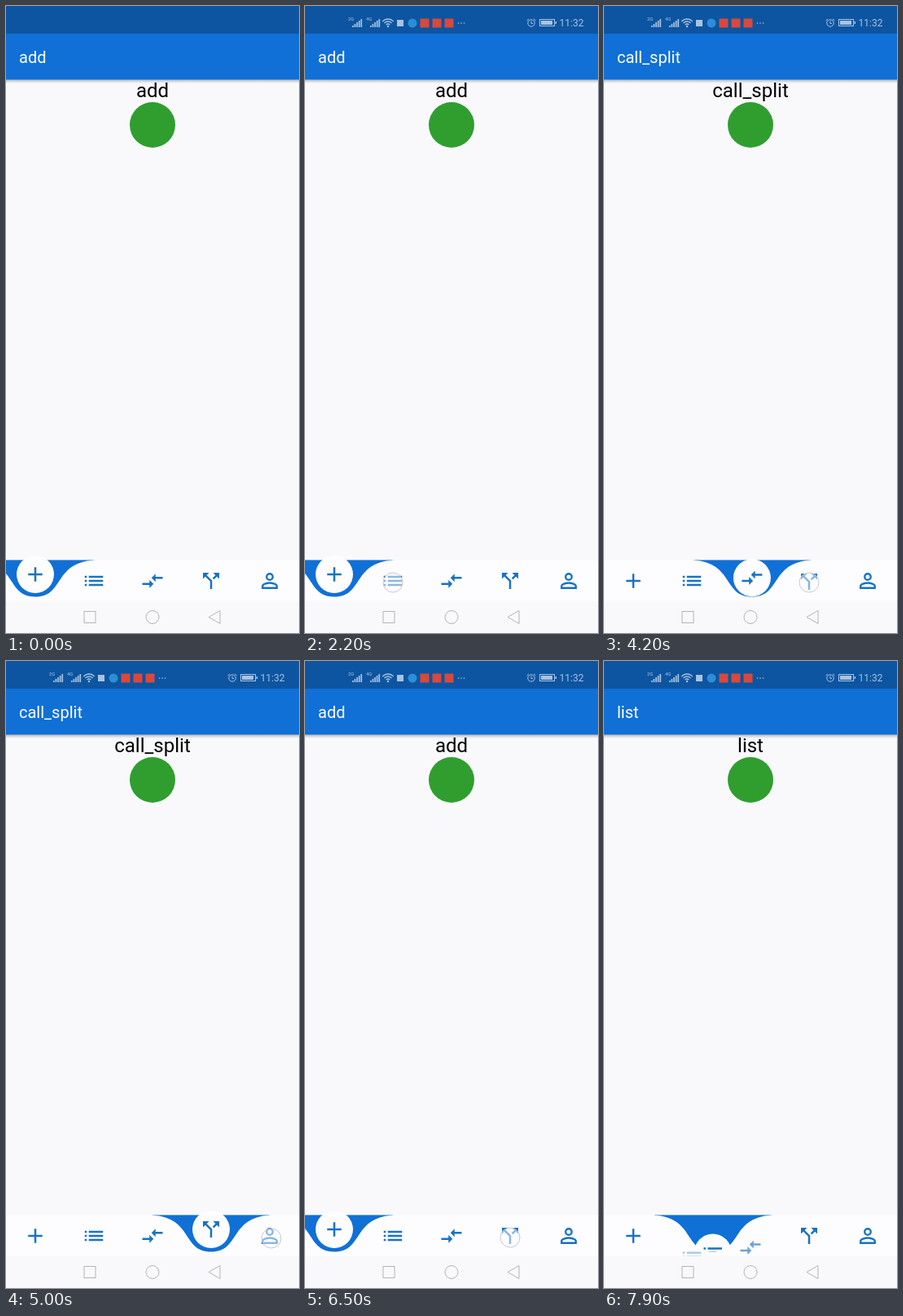
Animation, 360 px wide and 770 px high, one loop 8 s. Source, as an HTML page with a canvas:

```html
<!DOCTYPE html>
<html lang="en">
<head>
<meta charset="utf-8">
<title>Curved navigation bar</title>
<style>
  html, body { margin: 0; width: 100%; height: 100%; overflow: hidden; background: #f9f9fb; }
  canvas { display: block; width: 360px; height: 770px; }
</style>
</head>
<body>
<canvas id="stage"></canvas>
<script>
const W = 360, H = 770, LOOP = 8000, SLOT = W / 5;
const BAR_TOP = 680.4, BAR_BOTTOM = 731, CURVE = 75, MOVE = 700;
const BLUE = '#1070d6', ICON = '#1a72c2', STATUS = '#0d55a1', TINT = '#a9c3e2';
const PAPER = '#f9f9fb', BAR = '#fdfdff';

const canvas = document.getElementById('stage');
const ctx = canvas.getContext('2d');
const dpr = window.devicePixelRatio || 1;
canvas.width = W * dpr;
canvas.height = H * dpr;

const titles = ['add', 'list', 'compare_arrows', 'call_split', 'perm_identity'];
const icons = [
  'M5 11h14v2H5zM11 5h2v14h-2z',
  'M3 7h2v2H3zM3 11h2v2H3zM3 15h2v2H3zM7 7h14v2H7zM7 11h14v2H7zM7 15h14v2H7z',
  'M9 14H2v2h7v3l4-4-4-4zM15 13v-3h7V8h-7V5l-4 4z',
  'M14 4l2.3 2.3-2.9 2.9 1.4 1.4 2.9-2.9L20 10V4zM10 4H4v6l2.3-2.3 4.7 4.7V20h2v-8.4L7.7 6.3z',
  'M9 8a3 3 0 1 0 6 0a3 3 0 1 0-6 0zM5 19v-2c0-1.5 4-3 7-3s7 1.5 7 3v2z'
].map(d => new Path2D(d));

// Each tap: start of the move, destination slot, touch point.
const taps = [
  { at: 2260, to: 1, x: 108, y: 708 },
  { at: 3365, to: 2, x: 177, y: 706 },
  { at: 4190, to: 3, x: 252, y: 708 },
  { at: 5020, to: 4, x: 326, y: 709 },
  { at: 5726, to: 0, x: 40, y: 709 },
  { at: 6572, to: 3, x: 252, y: 708 },
  { at: 7453, to: 1, x: 108, y: 708 }
];

const clamp = v => Math.max(0, Math.min(1, v));

// cubic-bezier(0, 0, .58, 1)
function easeOut(x) {
  let lo = 0, hi = 1;
  for (let i = 0; i < 24; i++) {
    const s = (lo + hi) / 2;
    if (1.74 * s * s * (1 - s) + s ** 3 < x) lo = s; else hi = s;
  }
  return lo * lo * (3 - 2 * lo);
}

function navState(t) {
  let from = 0, to = 0, at = -MOVE;
  for (const tap of taps) {
    if (t < tap.at) break;
    from = to;
    to = tap.to;
    at = tap.at;
  }
  const p = easeOut(clamp((t - at) / MOVE));
  return {
    selected: to,
    pos: from + (to - from) * p,
    icon: p > 0.5 ? to : from,
    hide: 1 - Math.abs(1 - 2 * p)
  };
}

function rect(x, y, w, h, color) {
  ctx.fillStyle = color;
  ctx.fillRect(x, y, w, h);
}

function circle(x, y, r) {
  ctx.beginPath();
  ctx.arc(x, y, r, 0, 2 * Math.PI);
}

function disc(x, y, r, color) {
  circle(x, y, r);
  ctx.fillStyle = color;
  ctx.fill();
}

function text(str, x, y, size, color, align = 'left') {
  ctx.font = `${size}px Roboto, sans-serif`;
  ctx.textAlign = align;
  ctx.fillStyle = color;
  ctx.fillText(str, x, y);
}

function icon(index, x, y, alpha = 1) {
  ctx.save();
  ctx.globalAlpha = alpha;
  ctx.translate(x, y);
  ctx.scale(1.25, 1.25);
  ctx.translate(-12, -12);
  ctx.fillStyle = ctx.strokeStyle = ICON;
  ctx.lineWidth = 1.9;
  if (index === 4) ctx.stroke(icons[index]); else ctx.fill(icons[index]);
  ctx.restore();
}

function signal(x, label) {
  text(label, x - 5, 18, 6, TINT);
  for (let i = 0; i < 5; i++) rect(x + i * 2.6, 24 - i * 2, 1.7, 2 + i * 2, TINT);
}

function statusIcons(alpha) {
  ctx.save();
  ctx.globalAlpha = alpha;
  signal(58, '2G');
  signal(80, '4G');
  ctx.strokeStyle = TINT;
  ctx.lineWidth = 1.3;
  for (const r of [3, 6, 9]) {
    ctx.beginPath();
    ctx.arc(102, 25, r, -Math.PI * 0.77, -Math.PI * 0.23);
    ctx.stroke();
  }
  disc(102, 25, 1.2, TINT);
  rect(113, 17, 8, 8, TINT);
  disc(132, 21, 5.5, '#2a8fd6');
  for (const x of [147, 162, 177]) rect(x - 5.5, 15.5, 11, 11, '#d9483c');
  for (const x of [188.5, 192, 195.5]) disc(x, 21, 0.8, TINT);

  circle(278, 21, 4.2);
  ctx.moveTo(278, 18.5);
  ctx.lineTo(278, 21.5);
  ctx.lineTo(280, 21.5);
  ctx.moveTo(272.5, 18);
  ctx.lineTo(275, 15.8);
  ctx.moveTo(283.5, 18);
  ctx.lineTo(281, 15.8);
  ctx.lineWidth = 1;
  ctx.stroke();
  ctx.strokeRect(288.5, 16.5, 18, 8);
  rect(290, 18, 14, 5, TINT);
  rect(307.5, 19, 1.5, 3, TINT);
  text('11:32', 312.5, 25, 12, TINT);
  ctx.restore();
}

function appBar(title) {
  const shadow = ctx.createLinearGradient(0, 90, 0, 95);
  shadow.addColorStop(0, 'rgba(0,0,0,.28)');
  shadow.addColorStop(1, 'rgba(0,0,0,0)');
  rect(0, 90, W, 5, shadow);
  rect(0, 0, W, 34, STATUS);
  rect(0, 34, W, 56.4, BLUE);
  text(title, 16, 70, 20, '#fff');
}

function barShape(center) {
  const x = f => center + f * W;
  const y = f => BAR_TOP + f * CURVE;
  ctx.beginPath();
  ctx.moveTo(Math.min(0, x(-0.2)), BAR_TOP);
  ctx.lineTo(x(-0.2), BAR_TOP);
  ctx.bezierCurveTo(x(-0.06), y(0.05), x(-0.1), y(0.6), center, y(0.6));
  ctx.bezierCurveTo(x(0.1), y(0.6), x(0.06), y(0.05), x(0.2), BAR_TOP);
  ctx.lineTo(Math.max(W, x(0.2)), BAR_TOP);
  ctx.lineTo(Math.max(W, x(0.2)), H);
  ctx.lineTo(Math.min(0, x(-0.2)), H);
  ctx.closePath();
  ctx.fillStyle = BAR;
  ctx.fill();
}

function bottomBar(nav) {
  const center = (nav.pos + 0.5) * SLOT;
  const buttonY = 698 + nav.hide * 80;
  ctx.save();
  ctx.beginPath();
  ctx.rect(0, 0, W, BAR_BOTTOM);
  ctx.clip();
  rect(center - SLOT, BAR_TOP, 2 * SLOT, BAR_BOTTOM - BAR_TOP, BLUE);
  disc(center, buttonY, 23, BAR);
  icon(nav.icon, center, buttonY);
  barShape(center);
  for (let i = 0; i < 5; i++) {
    const gap = Math.min(1, Math.abs(nav.pos - i));
    icon(i, (i + 0.5) * SLOT, 706 + (1 - gap) * 40, gap);
  }
  ctx.restore();
}

function systemKeys() {
  ctx.strokeStyle = '#b4b4b8';
  ctx.lineWidth = 1;
  ctx.strokeRect(96, 743.5, 14, 14);
  circle(180, 750.5, 8);
  ctx.stroke();
  ctx.beginPath();
  ctx.moveTo(249, 750.5);
  ctx.lineTo(263, 742.5);
  ctx.lineTo(263, 758.5);
  ctx.closePath();
  ctx.stroke();
}

function touches(t) {
  for (const { at, x, y } of taps) {
    const dt = t - at;
    if (dt < -120 || dt > 250) continue;
    ctx.save();
    ctx.globalAlpha = 1 - clamp(dt / 250);
    disc(x, y, 12, 'rgba(253,253,255,.5)');
    ctx.strokeStyle = '#c6c8d0';
    ctx.lineWidth = 1;
    ctx.stroke();
    ctx.restore();
  }
}

function draw(t) {
  const nav = navState(t);
  const title = titles[nav.selected];
  ctx.setTransform(dpr, 0, 0, dpr, 0, 0);
  rect(0, 0, W, H, PAPER);
  appBar(title);
  statusIcons(clamp((t - 50) / 550));
  text(title, W / 2, 112, 24, '#000', 'center');
  disc(180, 146, 28, '#2f9e2f');
  bottomBar(nav);
  systemKeys();
  touches(t);
}

function tick() {
  draw(performance.now() % LOOP);
  requestAnimationFrame(tick);
}
tick();
</script>
</body>
</html>
```
